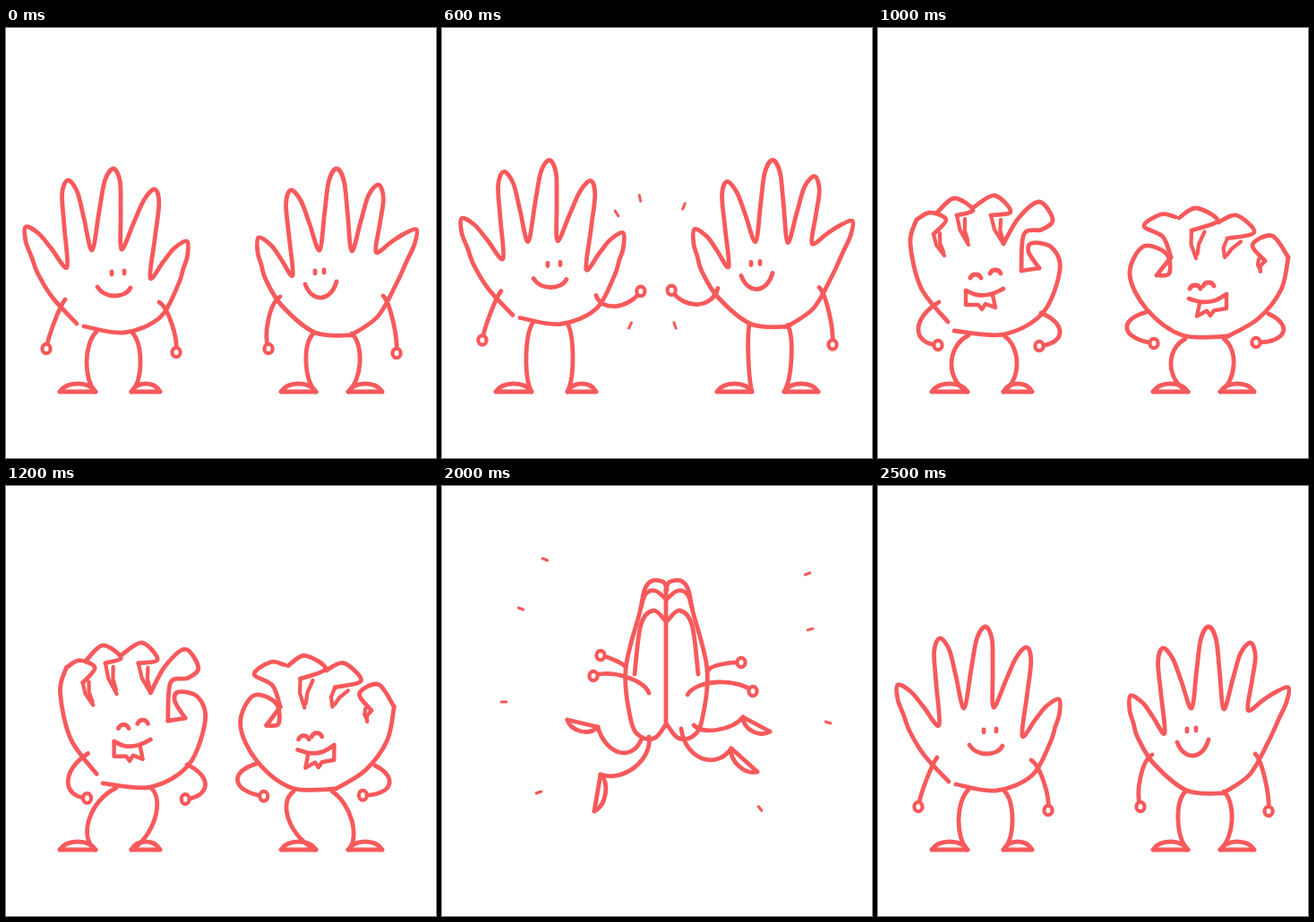
An HTML page with a canvas for the animation above (2.6 s loop, 480x480 px).

```html
<!DOCTYPE html>
<html lang="en">
<head>
<meta charset="utf-8">
<title>High five</title>
<style>
html, body { margin: 0; width: 100%; height: 100%; overflow: hidden; background: #fff; }
canvas { display: block; width: 100vw; height: 100vh; }
</style>
</head>
<body>
<canvas id="stage"></canvas>
<script>
const SIZE = 480, STEP = 100, STEPS = 26, GROUND = 406, INK = '#f8595b';
const ctx = document.getElementById('stage').getContext('2d');
const ratio = window.devicePixelRatio || 1;
ctx.canvas.width = ctx.canvas.height = SIZE * ratio;

// Turns "x y x y" into points.
const pts = s => s.match(/\S+ \S+/g).map(p => p.split(' ').map(Number));
const mix = (a, b, t) => a.map((v, i) => v + (b[i] - v) * t);
const plus = (p, x, y) => [p[0] + x, p[1] + y];
const unit = (a, b) => {
  const d = Math.hypot(b[0] - a[0], b[1] - a[1]);
  return [(b[0] - a[0]) / d, (b[1] - a[1]) / d];
};

const still = [1, 0, 0, 1, 0, 0];
let frame = still;

function ink(trace, width = 4.8, fill) {
  ctx.setTransform(...frame.map(v => v * ratio));
  ctx.beginPath();
  trace();
  ctx.setTransform(ratio, 0, 0, ratio, 0, 0);
  if (fill) ctx.fill();
  ctx.lineWidth = width;
  ctx.stroke();
}

const line = (p, width) => ink(() => p.forEach(q => ctx.lineTo(...q)), width);

// Smooth curve through all points.
function curve(p) {
  const at = i => p[Math.max(0, Math.min(p.length - 1, i))];
  const handle = (i, to, from) => at(i).map((v, k) => v + (at(to)[k] - at(from)[k]) / 6);
  ink(() => {
    ctx.moveTo(...p[0]);
    for (let i = 1; i < p.length; i++) {
      ctx.bezierCurveTo(...handle(i - 1, i, i - 2), ...handle(i, i - 1, i + 1), ...p[i]);
    }
  });
}

// Round arc from a to b with its middle at m.
function bow([a, m, b]) {
  const mid = mix(a, b, .5), dx = (m[0] - mid[0]) * 4 / 3, dy = (m[1] - mid[1]) * 4 / 3;
  ink(() => {
    ctx.moveTo(...a);
    ctx.bezierCurveTo(...plus(mix(a, b, .2), dx, dy), ...plus(mix(a, b, .8), dx, dy), ...b);
  });
}

function arm(p) {
  bow(p);
  ink(() => ctx.ellipse(...p[2], 4.6, 5.2, 0, 0, 7), 4.2, true);
}

function shoe(heel, toe, side) {
  const [ux, uy] = unit(heel, toe), s = ux < 0 ? side : -side;
  line([heel, toe]);
  bow([heel, plus(mix(heel, toe, .5), -uy * 9 * s, ux * 9 * s), toe]);
}

// Spread fingers: tips and the valleys between them, in turn.
function spread({ edge, fingers, palm, eyes, smile }) {
  const path = [...edge];
  fingers.forEach((tip, i) => {
    if (i % 2) return path.push(tip);
    const a = fingers[i - 1] || edge[edge.length - 1], b = fingers[i + 1] || palm[0];
    const [ux, uy] = unit(mix(a, b, .5), tip), neck = plus(tip, -14 * ux, -14 * uy);
    const l = plus(neck, uy * 8.5, -ux * 8.5), r = plus(neck, -uy * 8.5, ux * 8.5);
    path.push(mix(a, l, .55), l, tip, r, mix(r, b, .45));
  });
  curve([...path, ...palm]);
  eyes.forEach(e => line([e, plus(e, 0, 3)]));
  bow(smile);
}

const lip = pts('0 -1 13 4 28 3 42 -3');
const teeth = pts('0 0 0 15 14 15 18 20 22 14 33 18 30 4');

// Curled finger: knuckle arc, hooked tip and the gap below it.
function curl(p) {
  const [tip, hook, gap] = p.slice(2);
  curve(p.slice(0, 4));
  line([hook, plus(mix(hook, gap, .5), -3, 0), gap], 4.2);
  const top = plus(mix(tip, hook, .5), 0, 7);
  line([top, plus(mix(top, gap, .45), -2, 0), mix(top, gap, .85)], 4.2);
}

function clench({ side, curls, index, thumb, eyes, mouth, flip, tilt }) {
  curve(side);
  curls.forEach(curl);
  curve(index);
  curve(thumb);
  line([index[index.length - 1], thumb[0]]);
  eyes.forEach(e => bow([plus(e, -6, 4), e, plus(e, 6, 4)]));
  const place = ([x, y]) => plus(mouth[0], flip * x, y + x * tilt);
  curve(lip.map(place));
  line(teeth.map(place), 4.4);
}

const leftOpen = {
  show: spread,
  edge: pts('79 330 52 301 36 275'),
  fingers: pts('22 222 68 267 69 170 96 248 120 157 129 247 166 180 161 279 202 238'),
  palm: pts('192 287 172 323 132 340 87 333'),
  eyes: pts('118 272 132 271'), smile: pts('102 289 121 299 139 290'),
  arms: ['66 303 54 328 45 358', '171 306 185 330 190 362'].map(pts),
  hip: 339, knees: [90, 150]
};
const leftFist = {
  show: clench, flip: 1, tilt: 0,
  side: pts('78 328 48 290 36 240 43 214'),
  curls: ['43 214 58 206 76 214 62 230 74 254', '66 206 85 190 106 203 88 209 101 242',
    '107 200 130 187 148 205 126 209 140 241'].map(pts),
  index: pts('140 241 157 212 180 194 195 214 183 225 163 230 160 271'),
  thumb: pts('180 268 168 250 172 240 194 245 203 270 184 318 140 342 85 338'),
  eyes: pts('109 275 131 270'), mouth: pts('98 294'),
  arms: ['68 306 45 336 67 354', '182 318 203 340 180 355'].map(pts),
  hip: 343, knees: [82, 155]
};
const leftLand = {
  show: clench, flip: 1, tilt: .06,
  side: pts('76 347 45 320 27 270 40 238'),
  curls: ['40 238 50 234 65 243 53 250 71 284', '60 233 78 204 96 219 81 231 96 262',
    '96 222 117 200 138 214 121 225 126 260'].map(pts),
  index: pts('126 260 140 226 168 215 181 236 157 241 158 288'),
  thumb: pts('171 290 165 266 180 250 198 275 188 315 155 345 82 350'),
  eyes: pts('104 285 124 285'), mouth: pts('95 304'),
  arms: ['59 324 34 348 54 367', '174 316 189 345 167 366'].map(pts),
  hip: 349, knees: [79, 155]
};
const rightOpen = {
  show: spread,
  edge: pts('385 343 345 340 308 310 290 281'),
  fingers: pts('282 234 320 276 318 181 350 248 369 157 386 249 416 175 413 250 458 225'),
  palm: pts('436 285 415 322 385 343'),
  eyes: pts('345 271 355 270'), smile: pts('334 286 352 301 369 283'),
  arms: ['306 300 293 325 293 358', '421 299 432 327 436 363'].map(pts),
  hip: 341, knees: [335, 395]
};
const rightFist = {
  show: clench, flip: -1, tilt: .17,
  side: pts('391 344 425 324 450 292 458 256'),
  curls: ['458 256 440 232 418 242 432 260 427 272', '380 217 400 209 420 228 390 235 387 256',
    '336 212 355 201 379 215 350 226 355 257'].map(pts),
  index: pts('332 211 316 208 297 221 318 233 327 256'),
  thumb: pts('311 276 325 274 322 252 296 244 281 275 300 314 340 343 391 344'),
  eyes: pts('354 287 369 284'), mouth: pts('389 298'),
  arms: ['300 317 278 336 308 352', '436 319 452 340 422 351'].map(pts),
  hip: 347, knees: [327, 397]
};
// The thumb tucks under the first finger here.
const rightLand = {
  show: clench, flip: -1, tilt: .14,
  side: pts('395 354 432 326 452 285 455 255'),
  curls: ['455 255 436 229 413 238 426 250 428 277', '382 220 397 212 415 230 388 238 397 264',
    '340 220 360 206 381 224 347 229 357 262'].map(pts),
  index: pts('340 219 322 216 304 230 326 249 327 289'),
  thumb: pts('327 289 316 270 302 252 290 285 308 328 345 354 395 354'),
  eyes: pts('350 296 367 294'), mouth: pts('382 310'),
  arms: ['307 311 281 340 302 360', '421 312 450 333 430 360'].map(pts),
  hip: 354, knees: [321, 405]
};

const left = {
  open: leftOpen, fist: leftFist, land: leftLand,
  way: 1, cx: 118, base: 341, hips: [101, 140], heels: [100, 140], toes: [60, 172],
  inner: 1, bump: pts('172 308 194 320 222 303'), tall: [94, 146]
};
const right = {
  open: rightOpen, fist: rightFist, land: rightLand,
  way: -1, cx: 366, base: 344, hips: [343, 386], heels: [346, 382], toes: [307, 420],
  inner: 0, bump: pts('308 300 285 318 256 302'), tall: [342, 390]
};

function figure(who, { look, rise = 0, reach = 0, x = 0, y = 0, sx = 1, sy = 1, air }) {
  const pose = who[look], dx = x * who.way, lift = 9.5 * rise;
  const body = [sx, 0, 0, sy, who.cx * (1 - sx) + dx, who.base * (1 - sy) + y - lift];
  frame = body;
  pose.show(pose);
  pose.arms.forEach((p, i) => arm(i === who.inner ? p.map((q, j) => mix(q, who.bump[j], reach)) : p));

  // Planted feet stay put while the hips follow the body.
  frame = air ? body : still;
  const [mx, my] = air ? [0, 0] : [dx, y];
  const knees = mix(pose.knees, who.tall, rise);
  knees.forEach((knee, i) => {
    const hip = [who.hips[i] + mx, pose.hip + my - lift], heel = [who.heels[i], GROUND];
    bow([hip, [knee + mx / 2, (hip[1] + GROUND) / 2], heel]);
    shoe(heel, [who.toes[i], GROUND], 1);
  });
  frame = still;
}

const half = ['251 116 247 107 234 106 226 116 221 140 205 205 211 262 222 280 238 281 250 266',
  '222 136 227 121 238 117 250 126', '215 210 222 155 236 139 250 151'].map(pts);
const clapArms = ['231 231 205 213 169 212', '205 202 194 195 177 189',
  '274 233 307 219 347 229', '298 205 312 199 334 197'].map(pts);
const clapLegs = ['222 284 197 297 174 269 140 261', '231 280 215 314 177 322 170 363',
  '281 267 308 272 336 258 366 274', '267 271 290 304 323 293 352 319'].map(pts);

// Burst lines: both ends, then where they fly to; those without a goal fade early.
const burst = ['188 117 211 126 115 82', '188 162 199 166 88 137', '153 237 175 237 69 241',
  '189 278 198 275 108 342', '290 286 295 292 355 360', '306 239 316 242 431 264',
  '305 176 313 174 411 160', '296 143 321 134 408 98',
  '253 80 253 97', '288 112 294 108', '255 300 260 324'].map(pts);
const middle = [250, 215];
const flight = [-.1, 0, .35, .6, .8, .92, 1];

function together(step) {
  half.forEach(p => {
    curve(p);
    curve(p.map(([x, y]) => [501 - x, y]));
  });
  line([[250, 115], [250, 268]]);
  clapArms.forEach(arm);
  clapLegs.forEach(p => {
    bow(p);
    shoe(p[2], p[3], -1);
  });
  const u = flight[step - 14];
  if (u === undefined) return;
  burst.forEach(([a, b, goal]) => {
    if (!goal && u > .7) return;
    const mid = mix(a, b, .5), end = goal || plus(mid, (mid[0] - middle[0]) * .2, (mid[1] - middle[1]) * .12);
    const [ux, uy] = unit(a, b), s = goal ? 2.8 : .5;
    line([mix(a, plus(end, -ux * s, -uy * s), u), mix(b, plus(end, ux * s, uy * s), u)], 3.2);
  });
}

const hit = [239, 272], sparks = pts('195 207 221 190 270 199 210 332 260 332');

function spark(step) {
  const p = 1 - (6 - step) * .3, r = 3.4 * (2 - p);
  sparks.forEach(s => {
    const [ux, uy] = unit(hit, s), at = mix(hit, s, p);
    line([plus(at, -ux * r, -uy * r), plus(at, ux * r, uy * r)], 3);
  });
}

const moves = {
  9: { look: 'open', y: 3, sy: .86 },
  10: { look: 'fist' },
  11: { look: 'fist', x: 2, y: 7, sy: .96 },
  12: { look: 'fist', x: 22, y: -6, sx: .97, sy: 1.04 },
  13: { look: 'fist', x: 65, y: -70, sx: .7, air: true },
  22: { look: 'land', x: 30, y: -45, sx: .85, air: true },
  23: { look: 'land' },
  24: { look: 'open', y: 4, sy: .92 },
  25: { look: 'open' }
};

// Both rise on their toes, bump fists and sink back.
const greet = step => ({
  look: 'open',
  rise: Math.min(1, 1.3 * Math.sin(Math.PI * step / 8.6)),
  reach: 1.34 * Math.max(0, Math.sin(Math.PI * (step - .6) / 8.2)) ** 2.3
});

function draw(step) {
  ctx.setTransform(ratio, 0, 0, ratio, 0, 0);
  ctx.fillStyle = '#fff';
  ctx.fillRect(0, 0, SIZE, SIZE);
  ctx.strokeStyle = INK;
  ctx.lineCap = ctx.lineJoin = 'round';
  const move = step < 9 ? greet(step) : moves[step];
  if (!move) return together(step);
  figure(left, move);
  figure(right, move);
  if (step > 3 && step < 7) spark(step);
}

let start = null, shown = -1;
function tick(now) {
  if (start === null) start = now;
  const step = Math.floor((now - start) / STEP) % STEPS;
  if (step !== shown) draw(shown = step);
  requestAnimationFrame(tick);
}
draw(0);
requestAnimationFrame(tick);
</script>
</body>
</html>
```
